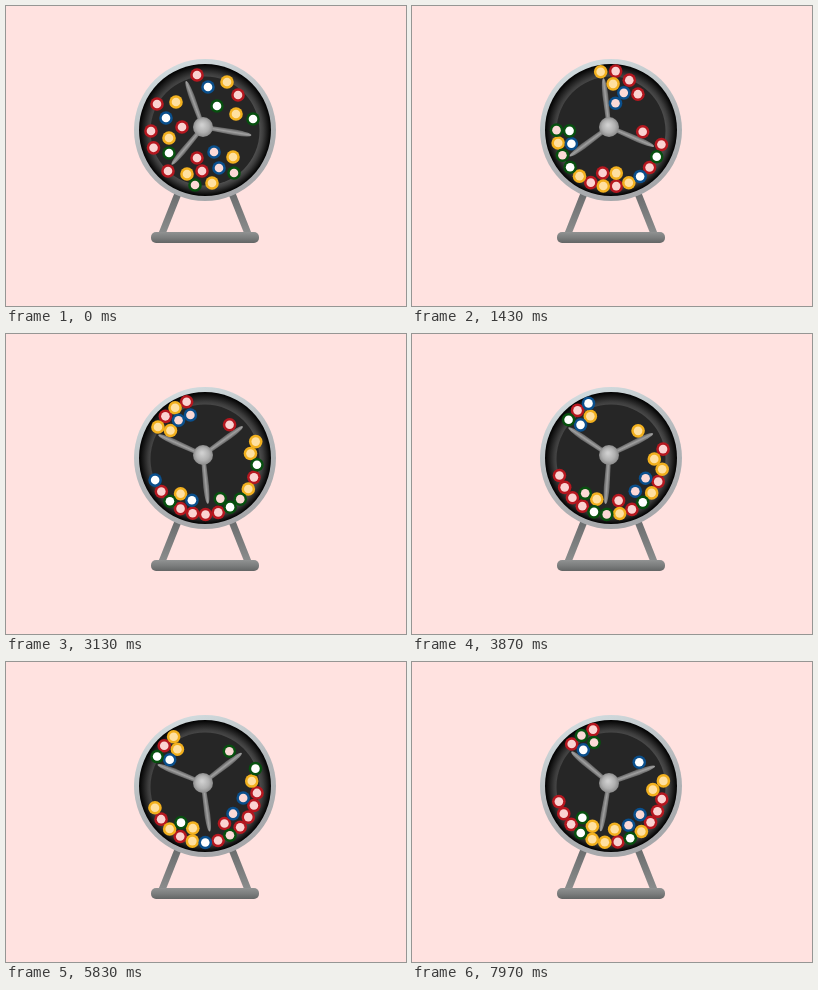
An HTML page with a canvas that plays this animation: 400x300 px, repeating every 8000 ms.

```html
<!DOCTYPE html>
<html lang="en">
<head>
<meta charset="utf-8">
<title>Lottery drum</title>
<style>
  html, body { margin: 0; width: 100%; height: 100%; overflow: hidden; background: #ffe2e0; }
  canvas { display: block; width: 400px; height: 300px; }
</style>
</head>
<body>
<canvas id="stage" width="400" height="300"></canvas>
<script>
const ctx = document.getElementById('stage').getContext('2d');
const TAU = Math.PI * 2;
const FRAMES = 240, FRAME_MS = 8000 / FRAMES;
const SUBSTEPS = 16, DT = FRAME_MS / 1000 / SUBSTEPS;
const HUB = { x: 197, y: 121, r: 10 };
const DRUM = { x: 199, y: 124, r: 71 };
// Region the ball centres stay within
const WALL = { x: 198, y: 122.5, rx: 53.5, ry: 58 };
const START = 9.7 * Math.PI / 180, TURN = 5.9 * Math.PI / 180;
const SPIN = TURN / FRAME_MS * 1000;
const RADIUS = 6.5, GRAVITY = 600, BLADE = 47, BLADE_HALF = 2.5;
const BOUNCE = 0.2, GRIP = 0.004;

const KINDS = [
  { rim: '#b5171f', face: '#fbd3d2', at: [191,69, 232,89, 151,98, 176,121, 145,125, 147,142, 162,165, 191,152, 196,165] },
  { rim: '#f2b01e', face: '#ffe0a0', at: [221,76, 170,96, 230,108, 163,132, 227,151, 181,168, 206,177] },
  { rim: '#0a4f8c', face: '#ffffff', at: [202,81, 160,112] },
  { rim: '#0a4f8c', face: '#fbd9d6', at: [208,146, 213,162] },
  { rim: '#07500f', face: '#ffffff', at: [211,100, 247,113, 163,147] },
  { rim: '#07500f', face: '#fbd9d6', at: [228,167, 189,179] }
];

const balls = [];
for (const kind of KINDS) {
  for (let i = 0; i < kind.at.length; i += 2) {
    balls.push({ kind, x: kind.at[i], y: kind.at[i + 1], vx: 0, vy: 0 });
  }
}

const bladeAngle = frame => START + frame * TURN;

// Push a ball out of a surface moving at (sx, sy)
function hit(b, nx, ny, depth, sx = 0, sy = 0) {
  b.x += nx * depth * 0.5;
  b.y += ny * depth * 0.5;
  const rx = b.vx - sx, ry = b.vy - sy;
  const vn = rx * nx + ry * ny;
  if (vn >= 0) return;
  const kick = (1 + BOUNCE) * vn;
  b.vx -= kick * nx + GRIP * (rx - vn * nx);
  b.vy -= kick * ny + GRIP * (ry - vn * ny);
}

function hitPair(a, b) {
  const dx = b.x - a.x, dy = b.y - a.y;
  const d = Math.hypot(dx, dy) || 1e-6;
  const depth = 2 * RADIUS - d;
  if (depth <= 0) return;
  const nx = dx / d, ny = dy / d, move = depth * 0.25;
  a.x -= nx * move; a.y -= ny * move;
  b.x += nx * move; b.y += ny * move;
  const vn = (b.vx - a.vx) * nx + (b.vy - a.vy) * ny;
  if (vn >= 0) return;
  const kick = (1 + BOUNCE) * vn / 2;
  a.vx += kick * nx; a.vy += kick * ny;
  b.vx -= kick * nx; b.vy -= kick * ny;
}

function hitBlades(b, angle) {
  for (let i = 0; i < 3; i++) {
    const c = Math.cos(angle + i * TAU / 3), s = Math.sin(angle + i * TAU / 3);
    const px = b.x - HUB.x, py = b.y - HUB.y;
    const t = Math.max(0, Math.min(BLADE, px * c + py * s));
    const qx = px - t * c, qy = py - t * s;
    const d = Math.hypot(qx, qy) || 1e-6;
    const depth = RADIUS + BLADE_HALF - d;
    if (depth > 0) hit(b, qx / d, qy / d, depth, -SPIN * t * s, SPIN * t * c);
  }
}

function hitHub(b) {
  const dx = b.x - HUB.x, dy = b.y - HUB.y;
  const d = Math.hypot(dx, dy) || 1e-6;
  const depth = RADIUS + HUB.r - d;
  if (depth > 0) hit(b, dx / d, dy / d, depth);
}

function hitWall(b) {
  const ux = (b.x - WALL.x) / WALL.rx, uy = (b.y - WALL.y) / WALL.ry;
  const d = Math.hypot(ux, uy);
  if (d <= 1) return;
  const gx = ux / WALL.rx, gy = uy / WALL.ry, g = Math.hypot(gx, gy);
  hit(b, -gx / g, -gy / g, (d - 1) * d / g);
}

function collide(angle) {
  for (let i = 0; i < balls.length; i++) {
    for (let j = i + 1; j < balls.length; j++) hitPair(balls[i], balls[j]);
  }
  for (const b of balls) {
    hitBlades(b, angle);
    hitHub(b);
    hitWall(b);
  }
}

function simulate() {
  for (let i = 0; i < 4; i++) collide(START);
  for (const b of balls) {
    const thrown = b.y < HUB.y && b.x > 185 ? 0.6 * SPIN : 0;
    b.vx = -thrown * (b.y - HUB.y);
    b.vy = thrown * (b.x - HUB.x);
  }
  const track = [];
  for (let f = 0; f < FRAMES; f++) {
    track.push(balls.map(b => ({ x: b.x, y: b.y })));
    for (let s = 1; s <= SUBSTEPS; s++) {
      for (const b of balls) {
        b.vy += GRAVITY * DT;
        b.x += b.vx * DT;
        b.y += b.vy * DT;
      }
      for (let i = 0; i < 4; i++) collide(bladeAngle(f + s / SUBSTEPS));
    }
  }
  return track;
}

function disc(x, y, r, fill) {
  ctx.fillStyle = fill;
  ctx.beginPath();
  ctx.arc(x, y, r, 0, TAU);
  ctx.fill();
}

function fade(gradient, ...stops) {
  stops.forEach(([at, color]) => gradient.addColorStop(at, color));
  return gradient;
}

const paint = {
  ring: fade(ctx.createLinearGradient(170, 53, 225, 195), [0, '#d3dde0'], [0.5, '#b3b7ba'], [1, '#a4a5a8']),
  bowl: fade(ctx.createRadialGradient(200, 126, 53, 199, 124, 66), [0, '#515151'], [0.35, '#3c3c3c'], [1, '#000']),
  base: fade(ctx.createLinearGradient(0, 226, 0, 237), [0, '#909292'], [0.5, '#7c7e7e'], [1, '#636565']),
  leg: fade(ctx.createLinearGradient(0, 190, 0, 228), [0, '#6d6f70'], [1, '#8b8d8d']),
  hub: fade(ctx.createRadialGradient(196, 119, 1, 197, 121, 10), [0, '#cfcfcf'], [0.6, '#b0b0b0'], [1, '#8a8a8a']),
  blade: fade(ctx.createLinearGradient(0, -3, 0, 3), [0, '#5c5c5c'], [0.5, '#a0a0a0'], [1, '#5c5c5c'])
};

function drawStand() {
  ctx.strokeStyle = paint.leg;
  ctx.lineWidth = 7;
  for (const side of [-1, 1]) {
    ctx.beginPath();
    ctx.moveTo(199 + side * 26, 185);
    ctx.lineTo(199 + side * 43.5, 229);
    ctx.stroke();
  }
  ctx.fillStyle = paint.base;
  ctx.beginPath();
  ctx.roundRect(145, 226, 108, 11, 5);
  ctx.fill();
}

function drawBlades(angle) {
  for (let i = 0; i < 3; i++) {
    ctx.save();
    ctx.translate(HUB.x, HUB.y);
    ctx.rotate(angle + i * TAU / 3);
    ctx.fillStyle = paint.blade;
    ctx.beginPath();
    ctx.moveTo(4, -2.2);
    ctx.lineTo(32, -2.9);
    ctx.quadraticCurveTo(49, -2.4, 49, 0);
    ctx.quadraticCurveTo(49, 2.4, 32, 2.9);
    ctx.lineTo(4, 2.2);
    ctx.fill();
    ctx.restore();
  }
}

function draw(frame) {
  ctx.fillStyle = '#ffe2e0';
  ctx.fillRect(0, 0, 400, 300);
  drawStand();
  disc(DRUM.x, DRUM.y, DRUM.r, paint.ring);
  disc(DRUM.x, DRUM.y, 66, paint.bowl);
  disc(199, 125, 54.5, '#262626');
  drawBlades(bladeAngle(frame));
  track[frame].forEach((p, i) => {
    disc(p.x, p.y, 6.8, balls[i].kind.rim);
    disc(p.x, p.y, 4.3, balls[i].kind.face);
  });
  disc(HUB.x, HUB.y, HUB.r, paint.hub);
}

const track = simulate();
const begin = performance.now();

function tick() {
  const t = Math.max(0, performance.now() - begin) % 8000;
  draw(Math.min(FRAMES - 1, Math.floor((t + 3.4) / FRAME_MS)));
  requestAnimationFrame(tick);
}
tick();
</script>
</body>
</html>
```
